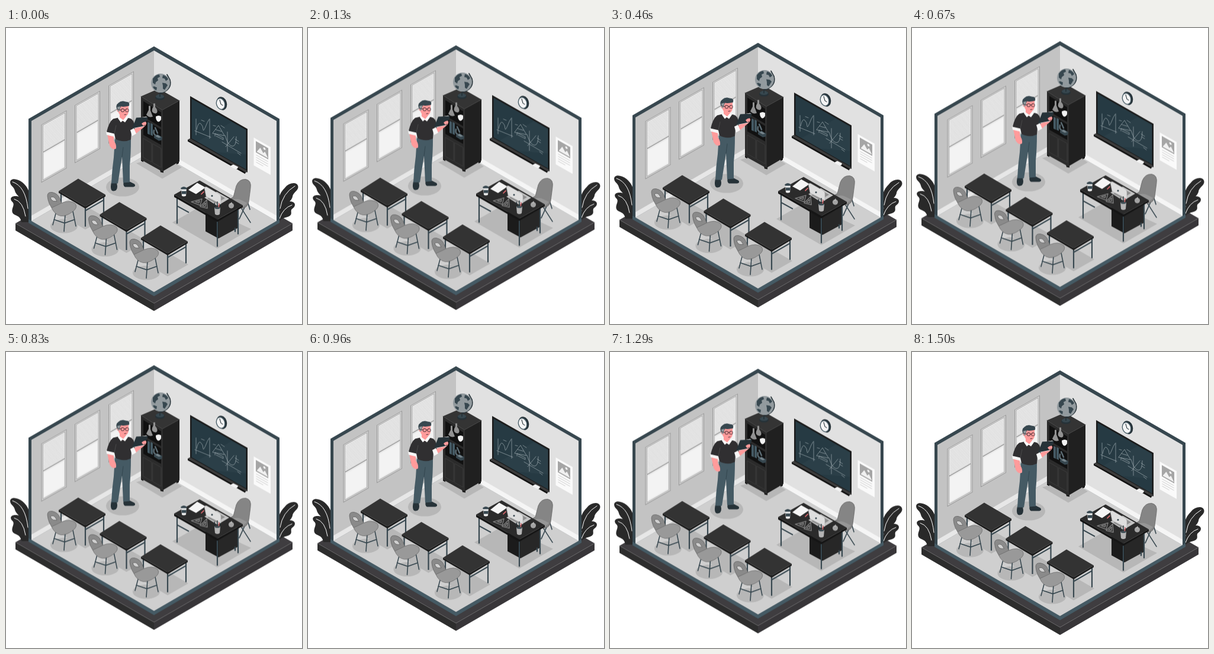
Animation, 500 px wide and 500 px high, one loop 1.54 s. Source, as an HTML page without scripts:

```html
<!DOCTYPE html>
<html lang="en">
<head>
<meta charset="utf-8">
<title>Classroom</title>
<style>
  html, body { margin: 0; width: 100%; height: 100%; overflow: hidden; background: #fff; }
  svg { display: block; width: 100%; height: 100%; }
  .float { animation: float 1540ms linear infinite; }
  @keyframes float {
    0%, 97.4%, 100% { transform: translateY(0); }
    48.7% { transform: translateY(-9.7px); }
  }
  .line { fill: none; stroke-linecap: round; stroke-linejoin: round; }
  .leg { fill: none; stroke: #37474f; stroke-width: 2.2; }
  .thin { fill: none; stroke: #37474f; stroke-width: 1.6; stroke-linecap: round; }
  .vein { fill: none; stroke: #fff; stroke-width: 1; stroke-linecap: round; }
  .chalk { fill: none; stroke: #a9b5ba; stroke-width: .65; stroke-linecap: round; }
  .shadow { fill: #b7b7b7; }
  .skin { fill: #ff9b9b; }
  .ink { fill: #263238; }
  .slate { fill: #37474f; }
</style>
</head>
<body>
<svg viewBox="0 0 500 500">
  <defs>
    <pattern id="blind" width="40" height="2.6" patternUnits="userSpaceOnUse">
      <rect width="40" height="2.6" fill="#f0f0f0"/>
      <rect width="40" height=".8" fill="#c6c6c6"/>
    </pattern>

    <g id="window">
      <rect width="42" height="97" fill="#d0d0d0" stroke="#999" stroke-width="1"/>
      <rect x="2.5" y="2.5" width="37" height="92" fill="#e9e9e9" stroke="#a2a2a2" stroke-width=".8"/>
      <rect x="4" y="4" width="34" height="42" fill="url(#blind)"/>
      <path d="M3 47.5H39" stroke="#a4a4a4" stroke-width="2"/>
      <rect x="4.5" y="51" width="33" height="41" fill="#f3f3f3"/>
    </g>

    <g id="table">
      <path class="leg" d="M93 277V312M134 300V335M165 283V318M134 308L165 290"/>
      <path d="M89 275L134 301 168 281V284L134 304.500 89 278Z" fill="#1c1c1c"/>
      <path d="M89 275L122 254 168 281 134 301Z" fill="#333"/>
    </g>

    <g id="chair">
      <path class="thin" d="M85 309L79 332M100 314L98 343M113 309L118 334M81 323L99 329 116 323"/>
      <path d="M70 283Q70 276 78 277Q88 279 91 288L95 298 81 308Q71 297 70 283Z" fill="#8a8a8a" stroke="#5b5b5b" stroke-width=".7"/>
      <path d="M77 303Q84 300 94 295Q108 289 117 296Q122 303 112 310Q103 317 93 317Q82 315 77 303Z" fill="#999" stroke="#666" stroke-width=".7"/>
      <path d="M75 286Q79 283 83 287L86 292Q80 293 77 290Z" fill="#d0d0d0" stroke="#555" stroke-width=".7"/>
    </g>

    <g id="set">
      <use href="#table"/>
      <use href="#chair"/>
    </g>
    <g id="set-shadow" class="shadow">
      <path d="M88 313L122 293 169 320 134 340Z"/>
      <ellipse cx="98" cy="334" rx="23" ry="12"/>
    </g>
  </defs>

  <g class="float">
    <!-- plinth -->
    <path d="M16 330L250 195 484 330 250 465Z" fill="#3f3d40"/>
    <path d="M16 330L250 465V478L16 342Z" fill="#2d2d2d"/>
    <path d="M484 330L250 465V478L484 342Z" fill="#383639"/>
    <path class="line" d="M16 330L250 465 484 330" stroke="#6b6b6b" stroke-width=".6"/>

    <!-- plants -->
    <g fill="#292929">
      <path d="M38 328C42 300 46 276 28 261C19 254 8 253 7 260C7 267 13 267 15 275C17 283 26 285 31 302Z"/>
      <path d="M38 328C38 303 31 285 18 284C7 283 6 290 11 294C16 299 8 305 11 312C14 318 24 315 26 328Z"/>
      <path d="M459 316C456 292 462 279 471 270C477 262 490 259 493 266C496 274 485 277 484 285C481 296 468 298 459 316Z"/>
      <path d="M459 329C460 309 468 294 479 293C490 293 490 301 484 305C478 309 487 315 476 319Q465 321 459 329Z"/>
    </g>
    <path class="vein" d="M11 260Q33 267 37 305M14 289Q29 293 33 318M488 267Q467 279 463 305M483 299Q468 304 462 322"/>

    <!-- room shell -->
    <path d="M250 31L462 153.500V329L250 453 38 329V153.500Z" fill="#37474f"/>
    <path d="M38 329L250 453 462 329V323L250 446 38 323Z" fill="#455a64"/>
    <path d="M43 326L250 206 457 326 250 446Z" fill="#cfcfcf"/>
    <path d="M43 157L250 38V206L43 326Z" fill="#c3c3c3"/>
    <path d="M457 157L250 38V206L457 326Z" fill="#e1e1e1"/>
    <path d="M43 317L250 197V206L43 326Z" fill="#e7e7e7"/>
    <path d="M457 317L250 197V206L457 326Z" fill="#f5f5f5"/>

    <!-- contents -->
    <g transform="translate(0 .6)">
      <use href="#window" transform="matrix(1 -.57 0 1 60 163)"/>
      <use href="#window" transform="matrix(1 -.57 0 1 116.500 130)"/>
      <use href="#window" transform="matrix(1 -.57 0 1 173.500 97)"/>

      <!-- floor shadows -->
      <g class="shadow">
        <path d="M220 228L264 215 297 235 264 254Z"/>
        <ellipse cx="197" cy="268" rx="28" ry="16"/>
        <path d="M281 328L330 300 414 339 357 372Z"/>
      </g>
      <use href="#set-shadow"/>
      <use href="#set-shadow" x="69.500" y="39.500"/>
      <use href="#set-shadow" x="139" y="79"/>

      <!-- cabinet -->
      <path d="M228 220h4v6l-4-2ZM260 238h6v6l-5-1ZM288 224h4v4l-4 2Z" fill="#151515"/>
      <path d="M228 115L258 102 293 122 264 138Z" fill="#343434"/>
      <path d="M228 115L264 138V242L228 222Z" fill="#2b2b2b"/>
      <path d="M264 138L293 122V225L264 242Z" fill="#202020"/>
      <path d="M232 123L262 142V167L232 149ZM232 153L262 171V197L232 180Z" fill="#111"/>
      <path class="line" d="M232 186L246 194V226L232 218ZM248 195L262 203V235L248 227ZM228 115L264 138 293 122M264 138V242" stroke="#424242" stroke-width=".7"/>
      <path d="M241 131h3v8l4 10q-6 3-11-3l4-8ZM249 127h3v6q7 8 1 11-8-1-6-8l2-4Z" fill="#929292"/>
      <path d="M253 149q5-3 9 0v5q-2 4-5 4-4-2-4-9Z" fill="#f3f3f3"/>
      <path d="M239 158l4 2v20l-4-2ZM244 160l4 2v20l-4-2Z" fill="#455a64"/>
      <path class="line" d="M252 168l4 9M250 172q-2 8 4 9" stroke="#5d6d75" stroke-width="2.400"/>
      <path d="M250 182l6-3 8 5-1 5-5 1-8-5Z" fill="#37474f"/>
      <path d="M252 182l4-2 6 4-4 1Z" fill="#78868d"/>

      <!-- globe -->
      <ellipse cx="260" cy="117" rx="8" ry="4" class="ink"/>
      <ellipse cx="260" cy="115" rx="7" ry="3.500" class="slate"/>
      <path class="line" d="M260 115V110Q281 104 277 87L272 78" stroke="#263238" stroke-width="1.800"/>
      <circle cx="261" cy="92.500" r="16" fill="#929a9e"/>
      <path class="slate" d="M248 85q5-7 11-7l1 4-4 2 1 4-4 3-1 4-4-3ZM265 79q6 1 9 7l-4 3-2-4-4-1ZM264 92l6 1 3 3-5 8-3-2 0-5ZM250 98l5 2-1 5q-4-2-6-6Z"/>

      <!-- blackboard -->
      <g transform="matrix(1 .57 0 1 311 114.500)">
        <rect width="97" height="73.500" fill="#1b1b1b"/>
        <rect x="2.500" y="3" width="92" height="67" fill="#263a43"/>
        <path d="M70 4H94V45L45 69H13Z" fill="#31464f" opacity=".45"/>
      </g>
      <path d="M307 188L311 186 408 241 404 245Z" fill="#3c3c3c"/>
      <path d="M307 188L404 243V246L307 191Z" fill="#111"/>
      <path d="M380 232l4-2 8 4-1 3-3 1-8-4Z" fill="#f3f3f3"/>
      <g class="chalk">
        <path d="M321 153V180M319 173L346 184M344 153V186M322 171q3-14 7-10t4 10 7-12l3-5M330 155l5 2"/>
        <path d="M349 177L359 164 369 181ZM354 171l10 3M353 182v-4l14 7v3l-12-6M350 164l4 1M363 164l6 4"/>
        <path d="M374 175V208M365 192L397 211M370 181q5 17 12 18t7-16M371 200l14-17M387 187l6 4M388 192l5 3M391 210l5 4"/>
      </g>

      <!-- clock -->
      <g transform="rotate(-18 364 127)">
        <ellipse cx="364.500" cy="127" rx="8.500" ry="11.500" class="ink"/>
        <ellipse cx="362.500" cy="127" rx="7" ry="9.500" fill="#f5f5f5" stroke="#455a64" stroke-width="1.300"/>
      </g>
      <path class="line" d="M361 121L363 128 366 130" stroke="#263238" stroke-width="1.100"/>

      <!-- poster -->
      <g transform="matrix(1 .57 0 1 418.500 184.500)">
        <rect width="28.500" height="47" fill="#fafafa"/>
        <rect x="3.500" y="4" width="21" height="19" fill="#a5a5a5"/>
        <path d="M5 21l6-10 5 6 3-4 5 8Z" fill="#f1f1f1"/>
        <circle cx="18" cy="8.500" r="2" fill="#f1f1f1"/>
        <path d="M4 27H24M4 31H24M4 35H24M4 39H16" stroke="#cfcfcf" stroke-width="1"/>
      </g>

      <!-- teacher -->
      <path class="ink" d="M178 260h9l1 7q0 8-7 8-6-1-3-15ZM199 259h10l8 4q3 4-2 5h-14q-4-2-2-9Z"/>
      <path d="M184 187L211 187Q211 213 209 232L209 260 198 261 196 217 189 262 178 262Q179 239 182 218Z" fill="#455a64"/>
      <path class="line" d="M196 217L198 201" stroke="#2f424b" stroke-width=".8"/>
      <path class="skin" d="M171 179L182 180 182 190Q187 196 186 203 180 207 175 198Z"/>
      <path d="M169 174L183 177 182 183 170 180Z" fill="#f7f7f7"/>
      <path d="M181 153Q174 158 170 175L183 178 185 187Q198 194 211 188L212 173 217 174Q219 155 209 152L194 150Z" fill="#302f31"/>
      <path class="line" d="M183 178L186 164" stroke="#555" stroke-width=".7"/>
      <path class="skin" d="M192 144H203L203 153 197 157 192 153Z"/>
      <path d="M190 149L198 155 203 149 206 152 201 159 197 156 194 159 189 152Z" fill="#fafafa"/>
      <path class="skin" d="M190 130Q198 125 207 130L207 142Q205 150 198 149 191 147 190 142 185 139 189 136Z"/>
      <path class="slate" d="M188 138Q184 130 190 126 195 121 202 124 210 124 208 131 200 133 194 132L192 138Z"/>
      <path d="M188 133L193 132 192 140 189 141Z" fill="#91999d"/>
      <g class="line" stroke="#3c2a31" stroke-width=".9">
        <rect x="194.500" y="136" width="5" height="5" rx="1.500"/>
        <rect x="202" y="136" width="5" height="5" rx="1.500"/>
        <path d="M189 137L194 138M200 138H202M200 146L203 145.500"/>
      </g>
      <path class="skin" d="M213 173L225 165 230 158 236 157Q239 161 234 166L217 180Z"/>
      <path d="M210 172L216 169 220 178 213 182Z" fill="#f7f7f7"/>
      <path d="M221 152L237 149 239 151 233 166 214 169Z" fill="#f3f3f3"/>
      <path class="ink" d="M220 151L240 150 234 165 213 169Z"/>
      <path class="skin" d="M229 161q4-4 7-3l1 3-5 4Z"/>

      <!-- office chair -->
      <path class="thin" d="M397 303L413 328M409 296L412 306M404 300L394 322"/>
      <path d="M389 266Q394 254 405 255 415 257 413 270L410 293Q408 305 395 304L378 296Q375 289 384 285Z" fill="#858585" stroke="#5d5d5d" stroke-width=".7"/>
      <path d="M378 292Q389 285 399 291L407 295Q401 304 392 302Z" fill="#969696"/>

      <!-- teacher desk -->
      <path class="leg" d="M289 284V330M289 300L309 311"/>
      <path d="M337 311L359 323V355L337 343Z" fill="#1b1b1b"/>
      <path d="M359 323L392 305V337L359 355Z" fill="#272727"/>
      <path class="leg" d="M357 322V369M392 303V348M387 337V344"/>
      <path d="M284 281L357 323 400 299V302L357 327 284 285Z" fill="#151515"/>
      <path d="M284 281L327 257 400 299 357 323Z" fill="#2b2b2b"/>
      <path d="M308 273L323 261 337 269 321 280Z" fill="#f5f5f5"/>
      <path class="line" d="M330 280L334 276" stroke="#e66a70" stroke-width="1.500"/>
      <path d="M335 286L356 276 377 288 357 300Z" fill="#c4c4c4"/>
      <path d="M340 288L356 279 370 287 355 296Z" fill="#8f8f8f"/>
      <path d="M335 269Q337 267 339 268L360 280Q363 282 363 285L363 297 338 284Z" fill="#dedede" stroke="#aaa" stroke-width=".6"/>
      <circle cx="348" cy="283" r="1.500" fill="#37474f"/>
      <path class="line" d="M313 293L331 288 328 299ZM320 293L327 291 326 295ZM328 301L339 290 340 304ZM332 300L337 295 337 301Z" stroke="#808080" stroke-width="1.400"/>
      <path d="M296 270H305L304 283Q300 285 297 283Z" fill="#f0f0f0"/>
      <path class="slate" d="M295 270Q300 265 306 270L305 272H296ZM297 275H305L304 280H297Z"/>
      <path class="line" d="M354 304L352 295M357 304V293" stroke="#263238" stroke-width="1.400"/>
      <path class="line" d="M359 304L360 296" stroke="#e66a70" stroke-width="1.400"/>
      <path d="M352 303Q357 301 362 303L361 314Q357 317 353 314Z" fill="#b4b4b4"/>
      <ellipse cx="357" cy="303.500" rx="4.500" ry="1.600" class="slate"/>
      <circle cx="380.500" cy="299.500" r="4.600" fill="#a3a3a3"/>
      <path class="line" d="M380 297L381 294" stroke="#ddd" stroke-width="1"/>

      <!-- student places -->
      <use href="#set"/>
      <use href="#set" x="69.500" y="39.500"/>
      <use href="#set" x="139" y="79"/>
    </g>
  </g>
</svg>
</body>
</html>
```
